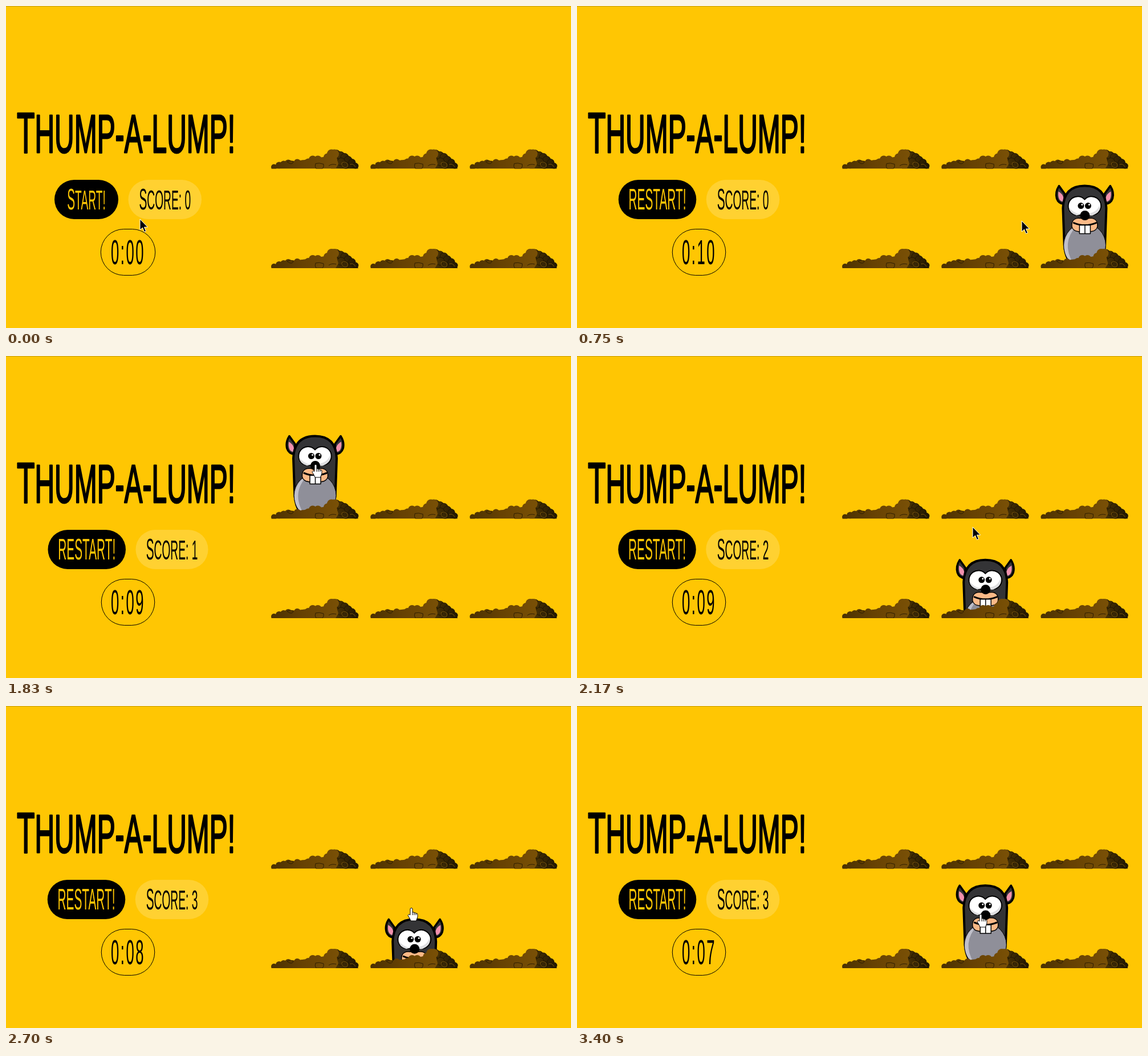
Animation of 991 by 565 pixels, one loop 3.46 s. Source, as an HTML page:

```html
<!DOCTYPE html>
<html lang="en">
<head>
<meta charset="utf-8">
<title>Thump-a-lump!</title>
<style>
  html, body { margin: 0; width: 100%; height: 100%; overflow: hidden; background: #ffc603; }
  svg { display: block; width: 991px; height: 565px; }
  text { font-family: "Liberation Sans", Arial, sans-serif; font-size: 48px; }
  .cap { font-size: 52px; }
</style>
</head>
<body>
<svg viewBox="0 0 991 565">
  <defs>
    <linearGradient id="soil" gradientUnits="userSpaceOnUse" x1="0" y1="0" x2="118" y2="0">
      <stop offset="0" stop-color="#4a3102"/>
      <stop offset=".45" stop-color="#664103"/>
      <stop offset="1" stop-color="#795006"/>
    </linearGradient>
    <linearGradient id="shade" gradientUnits="userSpaceOnUse" x1="108" y1="0" x2="153" y2="0">
      <stop offset="0" stop-color="#4d3505"/>
      <stop offset="1" stop-color="#211703"/>
    </linearGradient>
    <clipPath id="cell"><rect x="-10" y="-170" width="174" height="170"/></clipPath>

    <g id="mound" clip-path="url(#cell)">
      <g fill="url(#shade)">
        <path d="M105 0L110 -27L130 -22L150 -6L153 0Z"/>
        <g id="darkLumps" stroke="#191102" stroke-width=".8"/>
      </g>
      <g fill="url(#soil)">
        <path d="M0 0L5 -5L30 -12L70 -17L100 -22L110 -29L115 -20L118 -8L113 0Z"/>
        <g id="lumps"/>
      </g>
      <g fill="none" stroke="#2e1e02">
        <path d="M28 -12q5 -4 11 0q-1 4 -6 3zM78 -9q6 -2 14 1q1 5 -2 8h-11q-3 -4 -1 -9zM101 -5q5 -4 13 -2"/>
        <path d="M124 -10q7 -4 10 2q1 5 -3 6q-7 1 -7 -8zM138 -7q6 -3 10 4" stroke="#8a6110" stroke-width=".8"/>
      </g>
    </g>

    <g id="ear">
      <path d="M-35 -131L-45 -145Q-52 -134 -49 -123Q-46 -114 -36 -113Z" fill="#353537" stroke="#000" stroke-width="3.5" stroke-linejoin="round"/>
      <path d="M-37 -117Q-48 -118 -46 -135Q-35 -129 -37 -117Z" fill="#f191ad"/>
    </g>
    <g id="mole" stroke-linejoin="round">
      <use href="#ear"/><use href="#ear" transform="scale(-1 1)"/>
      <path d="M-20 -6C-32 -14 -36 -32 -36 -50L-38 -106C-37 -134 -22 -145 0 -145S37 -134 38 -106L36 -50C36 -32 32 -14 20 -6Z" fill="#343436" stroke="#000" stroke-width="4"/>
      <ellipse cy="-41" rx="37" ry="38" fill="#8f8f99" stroke="#000"/>
      <path d="M-14 -75C-42 -62 -42 -20 -20 -9Q-42 -45 -14 -75Z" fill="#c0c0ca"/>
      <g fill="#fff">
        <path d="M0 -121A16.500 16.500 0 1 0 -8 -94Q0 -91 8 -94A16.500 16.500 0 1 0 0 -121Z" stroke="#000" stroke-width="2"/>
        <path d="M27 -115Q29 -99 14 -93Q7 -92 4 -96Q24 -98 27 -115ZM-28 -108Q-27 -97 -14 -93L-7 -95Q-21 -97 -28 -108Z" fill="#dedee0"/>
      </g>
      <circle cx="-6.500" cy="-110" r="5.500"/><circle cx="6" cy="-110" r="5.500"/>
      <g fill="#fff"><circle cx="-4.500" cy="-112" r="1.500"/><circle cx="8" cy="-112" r="1.500"/></g>
      <path d="M0 -89C-6 -87 -9 -89 -14 -88C-24 -86 -26 -70 -16 -66Q0 -61 16 -66C26 -70 24 -86 14 -88C9 -89 6 -87 0 -89Z" fill="#fbb987" stroke="#000" stroke-width="1.500"/>
      <path d="M-19 -80Q0 -72 20 -80" fill="none" stroke="#000" stroke-width="3" stroke-linecap="round"/>
      <path d="M-9 -76H10V-61H-9ZM.5 -76V-61" fill="#fff" stroke="#000" stroke-width="1.500"/>
      <circle cx=".5" cy="-93" r="8.500"/>
    </g>
  </defs>

  <rect width="991" height="565" fill="#ffc603"/>
  <rect width="991" height="1" fill="#c79c0c"/>
  <text transform="translate(19 257) scale(.51 1)" stroke="#000" stroke-width="3" stroke-linejoin="round"
    style="font-size:94px"><tspan style="font-size:101px">T</tspan>HUMP-A-LUMP!</text>

  <g id="button"><rect y="305" height="69" rx="34.500"/><text fill="#ffc603" text-anchor="middle"></text></g>
  <g id="score"><rect y="305" height="69" rx="34.500" fill="#ffd131"/><text text-anchor="middle"></text></g>
  <g id="timer">
    <rect y="391.500" height="81" rx="40.500" fill="none" stroke="#000"/>
    <text text-anchor="middle" letter-spacing="6" style="font-size:61px"></text>
  </g>
  <g id="board"></g>
  <g id="cursor">
    <path id="arrow" d="M0 0V19L4.500 15L7.500 22.500L10.500 21L7.500 14H13.500Z" stroke="#fff"/>
    <path id="hand" d="M-2 1.500Q0 -1 2 1.500V8Q5 7 5 9Q8 8 8 10Q11 9 11 12V16L8.500 23H-1Q-3 18 -6 13.500Q-5 10 -2 12.500Z M2 8V13M5 9V13M8 10V13" fill="#fff" stroke="#000"/>
  </g>
</svg>
<script>
const LOOP = 3460, STEP = 68, TRAVEL = 174, EASE_MS = 400;
const $ = s => document.querySelector(s);

const circles = list => list.map(([x, y, r]) => `<circle cx="${x}" cy="${y}" r="${r}"/>`).join('');
$('#lumps').innerHTML = circles([[5, -3, 5], [14, -6, 6], [22, -8, 6], [30, -10, 6], [38, -8, 6],
  [46, -11, 6], [55, -9, 6], [65, -12, 6], [73, -16, 7], [82, -16, 7], [90, -13, 6], [99, -20, 7], [106, -26, 8], [111, -26, 8]]);
$('#darkLumps').innerHTML = circles([[114, -25, 8], [122, -23, 7], [129, -20, 7], [135, -15, 7],
  [123, -12, 7], [142, -11, 6], [131, -6, 6], [148, -5, 5]]);

const cells = [...Array(6).keys()].map(i => [465 + 174.2 * (i % 3), i < 3 ? 285.5 : 460]);
$('#board').innerHTML = cells.map(([x, y]) => `<g transform="translate(${x} ${y})">
  <g clip-path="url(#cell)"><use class="mole" href="#mole"/></g><use href="#mound"/></g>`).join('');
const moles = document.querySelectorAll('.mole');

// cell, time up, time down
const pops = [[5, 380, 1170], [0, 1170, 1945], [4, 1994, 2632], [1, 2790, 3000], [4, 3000, 9999]];
// step, x, y of the pointer tip
const path = [[0, 235, 374], [3, 150, 343], [5, 150, 343], [6, 165, 346], [11, 780, 377], [13, 888, 366],
  [17, 890, 364], [19, 897, 360], [21, 668, 262], [24, 560, 200], [26, 543, 190], [28, 543, 190],
  [29, 668, 388], [32, 694, 300], [35, 707, 345], [37, 711, 354], [45, 711, 354], [50, 708, 365]];
const hovers = [[2, 6], [13, 17], [24, 28], [35, 50]];

// the CSS "ease" curve
function ease(x) {
  if (x <= 0) return 0;
  if (x >= 1) return 1;
  let lo = 0, hi = 1, u;
  for (let i = 0; i < 16; i++) {
    u = (lo + hi) / 2;
    if (.75 * u * (1 - u) + u ** 3 < x) lo = u; else hi = u;
  }
  return .3 * (1 - u) ** 2 * u + 3 * (1 - u) * u * u + u ** 3;
}

function raised(cell, t) {
  return Math.max(0, ...pops.filter(p => p[0] === cell).map(([, up, down]) =>
    ease((Math.min(t, down) - up) / EASE_MS) * (1 - ease((t - down) / EASE_MS))));
}

function pointer(k) {
  const i = Math.max(1, path.findIndex(p => p[0] >= k));
  const [a, ax, ay] = path[i - 1], [b, bx, by] = path[i];
  const f = (k - a) / (b - a);
  return [ax + (bx - ax) * f, ay + (by - ay) * f];
}

const caps = s => `<tspan class="cap">${s[0]}</tspan>${s.slice(1)}`;

function pill(id, x, width, baseline, scale, html) {
  const rect = $(id + ' rect'), text = $(id + ' text');
  rect.setAttribute('x', x);
  rect.setAttribute('width', width);
  text.setAttribute('transform', `translate(${x + width / 2} ${baseline}) scale(${scale} 1)`);
  if (text.dataset.html !== html) text.innerHTML = text.dataset.html = html;
}

function draw(k) {
  const t = k * STEP, on = k >= 3;
  const points = [16, 28, 39].filter(s => k >= s).length;
  const time = !on ? '0:00' : k < 20 ? '0:10' : k < 35 ? '0:09' : k < 49 ? '0:08' : '0:07';
  const bw = on ? 136.5 : 112, sw = [128.5, 127, 129.5, 128.5][points], tw = on ? 93.5 : 95.5;
  const left = 214 - (bw + 17.5 + sw) / 2, mid = left + bw / 2;

  pill('#button', left, bw, 357, .4, on ? '<tspan class="cap">RESTART!</tspan>' : caps('START!'));
  pill('#score', left + bw + 17.5, sw, 357, .4, caps('SCORE: ' + points));
  pill('#timer', 214 - tw / 2, tw, 452.5, .42, time);
  const grow = k >= 2 && k < 6 ? 1.05 : 1;
  $('#button').setAttribute('transform', `translate(${mid} 339.5) scale(${grow}) translate(${-mid} -339.5)`);

  moles.forEach((m, i) => m.setAttribute('transform', `translate(77 ${TRAVEL * (1 - raised(i, t))})`));

  const over = hovers.some(([a, b]) => k >= a && k <= b);
  $('#cursor').setAttribute('transform', `translate(${pointer(k)})`);
  $('#arrow').style.display = over ? 'none' : '';
  $('#hand').style.display = over ? '' : 'none';
}

const start = performance.now();
function tick() {
  const t = (performance.now() - start) % LOOP;
  draw(Math.min(50, Math.floor((t + 20) / 67.9)));
  requestAnimationFrame(tick);
}
tick();
</script>
</body>
</html>
```
